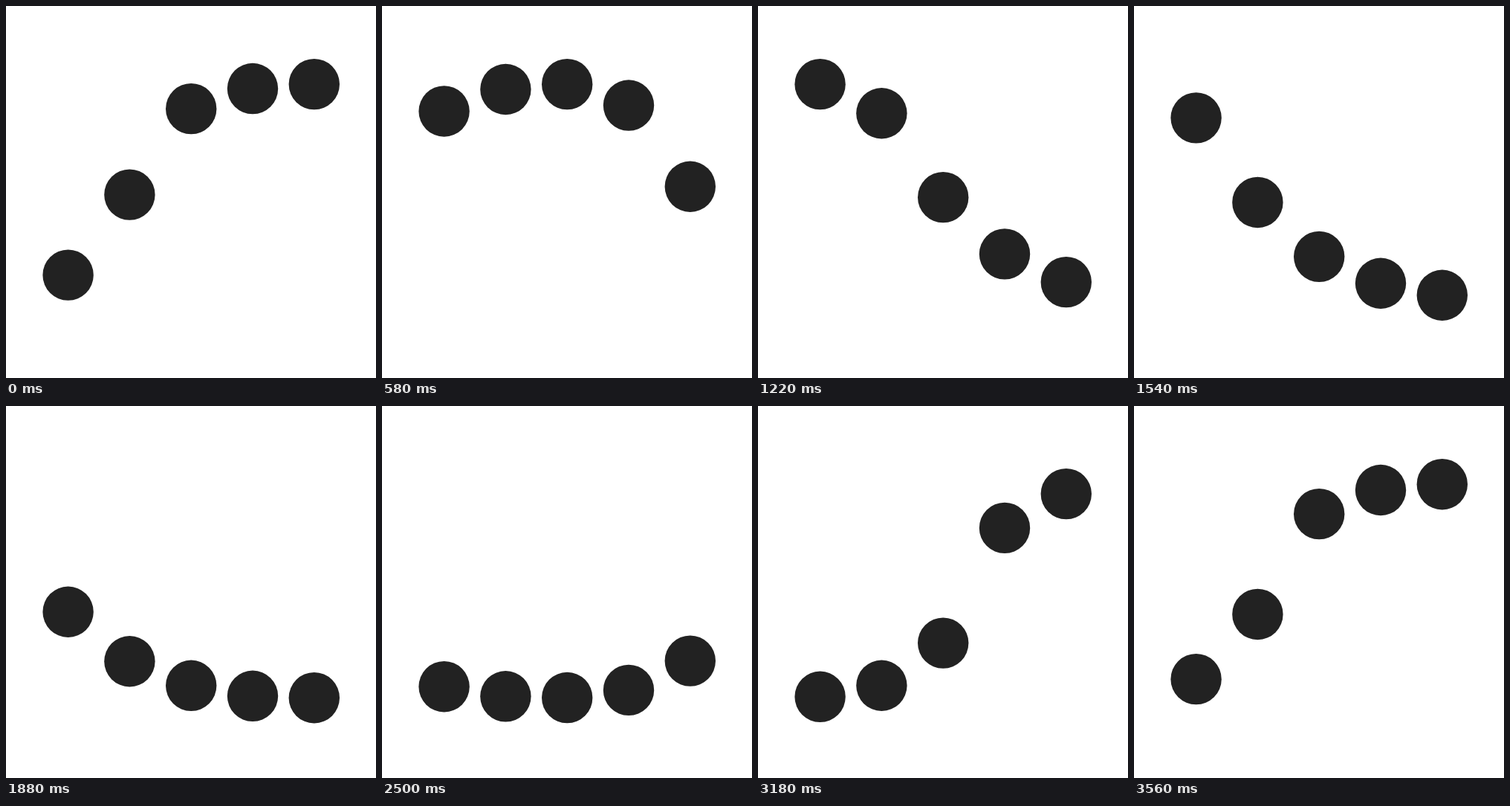
Write an HTML page that moves like this. It is 498 px wide and 500 px high and loops after 3.58 s.

```html
<!DOCTYPE html>
<html lang="en">
<head>
<meta charset="utf-8">
<title>Bouncing dots</title>
<style>
  html, body { margin: 0; width: 100%; height: 100%; overflow: hidden; background: #fff; }
  svg { display: block; width: 498px; height: 500px; fill: #222; }
</style>
</head>
<body>
<svg viewBox="0 0 498 500">
  <circle cx="83.6" r="34.2"/>
  <circle cx="166.4" r="34.2"/>
  <circle cx="249.2" r="34.2"/>
  <circle cx="332" r="34.2"/>
  <circle cx="414.8" r="34.2"/>
</svg>
<script>
  const LOOP = 3580, STEP = 20;      // the loop cuts slightly before a full cycle
  const CYCLE = 3600, HALF = CYCLE / 2, DELAY = 300, SHIFT = -7;
  const TOP = 105.1, BOTTOM = 392.5;
  const dots = [...document.querySelectorAll('circle')];

  // Same as cubic-bezier(x1, 0, x2, 1)
  const bezier = (x1, x2) => x => {
    let lo = 0, hi = 1;
    for (let i = 0; i < 24; i++) {
      const s = (lo + hi) / 2, r = 1 - s;
      if (3 * r * r * s * x1 + 3 * r * s * s * x2 + s * s * s < x) lo = s; else hi = s;
    }
    return lo * lo * (3 - 2 * lo);
  };
  const fall = bezier(0.33, 0.21);
  const rise = bezier(0.77, 0.23);

  function height(time) {
    const u = (time % CYCLE + CYCLE) % CYCLE;
    const k = u < HALF ? fall(u / HALF) : 1 - rise((u - HALF) / HALF);
    return TOP + (BOTTOM - TOP) * k;
  }

  function draw(now) {
    const t = Math.floor(now % LOOP / STEP) * STEP + SHIFT;
    dots.forEach((dot, i) => {
      const lag = (dots.length - 1 - i) * DELAY;
      dot.setAttribute('cy', height(t - lag).toFixed(2));
    });
  }

  function tick(now) {
    draw(now);
    requestAnimationFrame(tick);
  }

  draw(0);
  requestAnimationFrame(tick);
</script>
</body>
</html>
```
